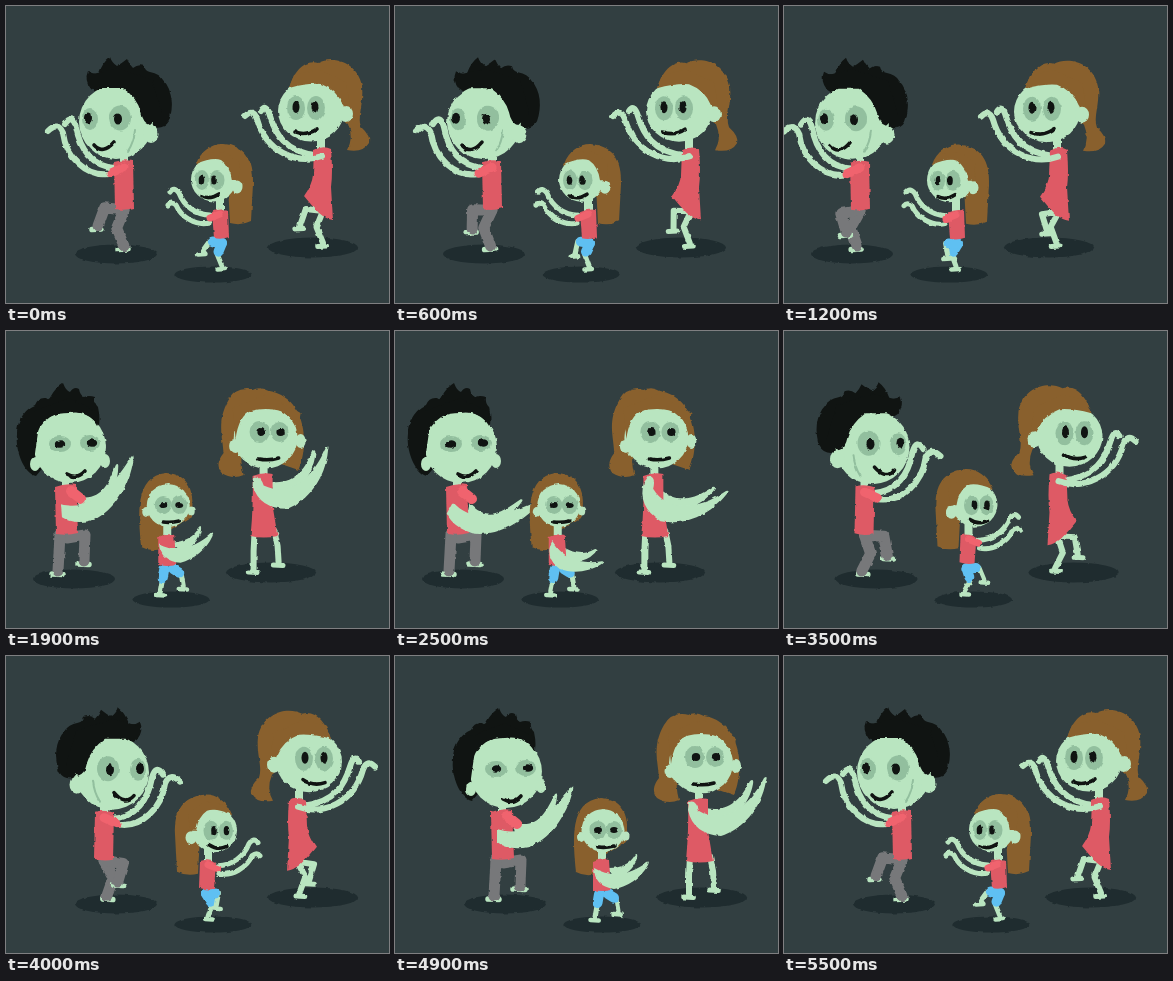
An HTML page with a canvas that plays this animation: 383 px wide and 297 px high, repeating every 5.6 s.

```html
<!DOCTYPE html>
<html lang="en">
<head>
<meta charset="utf-8">
<title>Zombie family dance</title>
<style>
  html, body { margin: 0; width: 100%; height: 100%; overflow: hidden; background: #323f41; }
  canvas { display: block; filter: url(#rough); }
  svg { position: absolute; width: 0; height: 0; }
</style>
</head>
<body>
<canvas id="stage" width="383" height="297"></canvas>
<svg aria-hidden="true">
  <filter id="rough" x="0" y="0" width="1" height="1" color-interpolation-filters="sRGB">
    <feTurbulence type="fractalNoise" baseFrequency=".16" numOctaves="2" seed="4"/>
    <feDisplacementMap in="SourceGraphic" scale="3" xChannelSelector="R" yChannelSelector="G"/>
  </filter>
</svg>
<script>
const ctx = document.getElementById('stage').getContext('2d');
const SKIN = '#b9e5c0', SHADE = '#92bf9e', DARK = '#101412', BROWN = '#89602d',
      RED = '#de5a65', SLEEVE = '#f0636e', GREY = '#77787a', BLUE = '#5fc0f2',
      GROUND = '#1f2c2f', BG = '#323f41';

// Walk art faces left, reach art faces right; axis is the line they flip about.
const family = [
  {
    axis: 108, shadow: [110, 248, 41, 9.5], k: 1, hip: [118, 204], floor: 244,
    legColor: GREY, legWidth: 11, footWidth: 5.5,
    walk: {
      hair: [DARK, 'M85 83Q78 74 82 65Q88 69 93 67Q97 56 104 51Q106 57 111 60Q116 57 121 53Q123 58 127 62Q132 58 138 60Q139 65 144 66Q154 68 157 74C167 84 168 101 163 115Q158 124 146 121L120 105Z'],
      face: [110, 116, 37, 37], ears: [[145, 128, 7.5, 9]],
      fringe: [DARK, 'M84 82Q104 82 117 82Q131 92 135 106Q137 117 144 119L156 108L146 74L110 62L84 69Z'],
      patches: [[84, 113, 8, 11], [114, 112, 11, 12.5]],
      eyes: [[82, 112, 4, 5.5], [112, 113, 4, 5.5]],
      mouth: 'M88 139Q97 149 108 136', scar: 'M129 124Q128 136 122 145',
      neck: 'M118 148V158', shirt: 'M108 156Q117 153 127 155L128 202Q119 205 109 203Z',
      sleeve: 'M118 161L105 167', sleeveWidth: 9, armWidth: 6,
      near: 'M103 168C80 171 60 151 57 127Q52 115 42 125',
      far: 'M110 162C86 161 74 143 70 121Q66 107 59 118'
    },
    reach: {
      hair: [DARK, 'M77 145C64 142 56 118 58 103C58 88 68 77 76 74Q79 66 87 67Q90 70 92 65Q97 56 104 52Q107 60 111 61Q115 55 120 58Q121 64 125 66Q130 64 136 66Q135 72 139 76Q142 90 139 97L110 105Z'],
      face: [111, 116, 36, 36], ears: [[146, 130, 5, 7], [76, 133, 5, 7]],
      fringe: [DARK, 'M75 130Q78 107 80 95Q89 82 110 82Q130 79 139 95L138 80L110 67L75 80Z'],
      patches: [[101, 113, 11, 8], [131, 112, 10, 8]],
      eyes: [[101, 113, 5.2, 3.8], [133, 112, 5.2, 3.8]],
      mouth: 'M108 143Q118 149 126 140',
      neck: 'M107 148V157', shirt: 'M96 156Q107 152 117 154L119 202Q108 205 97 203Z',
      sleeve: 'M112 160L122 168', sleeveWidth: 10, shoulder: [106, 174],
      near: 'M102 173C128 182 150 166 176 131Q179 129 178 134C172 160 154 184 134 191Q114 195 102 186Z',
      far: 'M117 166C142 174 150 158 160 138Q163 136 162 141C160 162 144 180 122 183Z',
      legs: [[108, 207, 126, 204, 125, 230], [101, 203, 100, 222, 99, 240]]
    }
  },
  {
    axis: 304, shadow: [307, 241.5, 45, 10], k: .88, hip: [317, 205], floor: 241,
    legColor: SKIN, legWidth: 6, footWidth: 5,
    walk: {
      hair: [BROWN, 'M283 83C287 66 299 53 312 57C326 50 351 55 356 80C358 98 351 110 355 121Q365 130 363 137Q357 147 341 144Q348 132 342 118L320 100Z'],
      face: [305, 105, 33, 30.5], ears: [[340, 108, 7, 8]],
      fringe: [BROWN, 'M283 82Q302 77 315 78Q331 84 337 99L344 99L340 76L312 63L288 69Z'],
      patches: [[290, 102, 9, 12], [310, 102, 9, 12]],
      eyes: [[290, 101, 3.5, 6], [309, 101, 3.5, 6]],
      mouth: 'M289 126Q301 130 311 123',
      neck: 'M315 132V146', shirt: 'M308 144Q317 139 325 143Q327 166 325 181L327 214Q320 213 313 207Q305 199 298 190Q306 179 307 169Z',
      armWidth: 6,
      near: 'M316 150C291 159 260 146 251 113Q247 102 239 110',
      far: 'M310 149C279 146 269 127 264 110Q260 97 255 105'
    },
    reach: {
      hair: [BROWN, 'M339 139C350 114 347 66 309 60Q300 55 293 59Q277 55 269 69C257 90 263 104 264 122Q255 133 262 142Q273 149 284 144Q280 130 283 120Z'],
      face: [306, 107, 32, 30.5], ears: [[341, 110, 5, 7], [275, 115, 5.5, 7]],
      fringe: [BROWN, 'M276 108Q279 85 291 80Q306 76 322 80Q335 88 338 102L341 82L307 63L273 77Z'],
      patches: [[300, 101, 10, 11], [320, 101, 9, 10]],
      eyes: [[301, 101, 4.2, 4], [321, 101, 4.2, 4]],
      mouth: 'M299 128Q309 130 319 127',
      neck: 'M304 132V146', shirt: 'M293 145Q303 141 313 143L313 175L318 205Q304 208 291 205Q294 172 293 145Z',
      shoulder: [298, 154],
      near: 'M294 146Q301 143 304 155C326 168 352 155 369 122Q373 119 371 125C366 154 346 174 326 180Q298 178 293 154Z',
      far: 'M311 152C335 157 347 141 355 125Q359 122 358 128C354 149 338 167 315 168Z',
      legs: [[315, 200, 318, 215, 319, 231], [295, 200, 294, 220, 294, 238]]
    }
  },
  {
    axis: 208, shadow: [207, 268.5, 38.5, 8], k: .75, hip: [216, 237], floor: 264,
    legColor: SKIN, legWidth: 5, footWidth: 4.5, shorts: true,
    walk: {
      hair: [BROWN, 'M190 158C195 144 207 137 218 138C239 140 248 154 247 178L245 215Q235 220 224 217L222 180Z'],
      face: [207.5, 173.5, 22.5, 22], ears: [[231, 181, 5.5, 6.5]],
      fringe: [BROWN, 'M190 158Q206 151 215 154Q224 160 226 174L233 174L234 156L218 145L198 147Z'],
      patches: [[196, 174, 7, 10], [211, 174, 7.5, 10]],
      eyes: [[195.5, 174, 2.8, 4.6], [208, 174, 2.8, 4.6]],
      mouth: 'M196 190Q204 194 213 188',
      neck: 'M214 193V206', shirt: 'M206 206Q214 202 222 204L223 231Q215 234 208 232Z',
      sleeve: 'M214 208L204 212', sleeveWidth: 7, armWidth: 5,
      near: 'M203 217C190 220 175 211 170 199Q165 195 162 199',
      far: 'M204 209C190 209 178 200 173 187Q168 180 164 186'
    },
    reach: {
      hair: [BROWN, 'M181 216C178 184 174 145 206 142C230 143 235 163 231 186L208 200L202 218Q190 221 181 216Z'],
      face: [208, 174.5, 21.5, 21.5], ears: [[231, 180, 3.5, 4.5], [186, 181, 4, 5]],
      fringe: [BROWN, 'M185 177Q187 159 196 155Q208 151 220 155Q228 160 229 172L231 162L208 146L184 157Z'],
      patches: [[203, 174, 8.5, 9], [219, 174, 8, 9]],
      eyes: [[203, 174, 4, 3], [219, 174, 4, 3]],
      mouth: 'M203 191Q211 192 219 190',
      neck: 'M207 193V206', shirt: 'M198 206Q206 202 214 204L216 234Q207 236 198 234Z',
      shoulder: [204, 216],
      near: 'M199 212C218 223 237 218 252 206Q255 204 253 209C246 222 232 231 219 233Q199 230 199 212Z',
      far: 'M211 212Q232 213 240 199Q243 196 242 202Q238 217 221 222Z',
      legs: [[213, 238, 221, 243, 223, 255], [204, 238, 202, 250, 200, 261]]
    }
  }
];

// Foot offset from the hip over one two-step cycle: phase, x, y.
const stride = [[0, -26, -20], [.35, -12, 0], [1, 0, 0], [1.4, 14, 0],
                [1.6, 9, -9], [1.85, -14, -14], [2, -26, -20]];

const mix = (a, b, u) => a + (b - a) * u;

function fill(color, d) {
  ctx.fillStyle = color;
  ctx.fill(new Path2D(d));
}
function stroke(color, width, d) {
  ctx.strokeStyle = color;
  ctx.lineWidth = width;
  ctx.stroke(new Path2D(d));
}
function oval(color, [x, y, rx, ry]) {
  ctx.fillStyle = color;
  ctx.beginPath();
  ctx.ellipse(x, y, rx, ry, 0, 0, 7);
  ctx.fill();
}

function footAt(phase) {
  const q = ((phase % 2) + 2) % 2;
  const i = stride.findIndex(s => s[0] > q);
  const a = stride[i - 1], b = stride[i], u = (q - a[0]) / (b[0] - a[0]);
  return [mix(a[1], b[1], u), mix(a[2], b[2], u)];
}

// Two equal bones, knee bending forward.
function walkLeg(c, phase, bob) {
  const [fx, fy] = footAt(phase);
  const hx = c.hip[0], hy = c.hip[1] + bob;
  const ax = hx + fx * c.k, ay = c.floor - 4 + fy * c.k;
  const dx = ax - hx, dy = ay - hy, dist = Math.hypot(dx, dy);
  const bone = (c.floor - 4 - c.hip[1]) * .54;
  const bend = Math.sqrt(Math.max(0, bone * bone - dist * dist / 4));
  const kx = (hx + ax) / 2 - dy / dist * bend, ky = (hy + ay) / 2 + dx / dist * bend;
  return [hx, hy, kx, ky, ax, ay];
}

function drawLeg(c, [hx, hy, kx, ky, ax, ay], heel, toe) {
  stroke(SKIN, c.footWidth, `M${ax + heel * c.k} ${ay + 3}L${ax + toe * c.k} ${ay + 3.5}`);
  stroke(c.legColor, c.legWidth, `M${hx} ${hy}L${kx} ${ky}L${ax} ${ay}`);
  if (c.shorts) {
    stroke(BLUE, 10, `M${hx} ${hy}L${mix(hx, kx, .75)} ${mix(hy, ky, .75)}`);
  }
}

function drawHead(a) {
  fill(...a.hair);
  stroke(SKIN, 8, a.neck);
  oval(SKIN, a.face);
  fill(...a.fringe);
  a.ears.forEach(e => oval(SKIN, e));
  a.patches.forEach(p => oval(SHADE, p));
  a.eyes.forEach(e => oval(DARK, e));
  stroke(DARK, 3.6, a.mouth);
  if (a.scar) stroke(SHADE, 2, a.scar);
}

function drawWalk(c, step) {
  const a = c.walk, bob = 3 * Math.sin(Math.PI * step) ** 2;
  drawLeg(c, walkLeg(c, step + 1, bob), 4, -6);
  drawLeg(c, walkLeg(c, step, bob), 4, -6);
  ctx.translate(0, bob);
  drawHead(a);
  stroke(SKIN, a.armWidth, a.far);
  fill(RED, a.shirt);
  stroke(SKIN, a.armWidth, a.near);
  if (a.sleeve) stroke(SLEEVE, a.sleeveWidth, a.sleeve);
}

function drawReach(c, turn) {
  const a = c.reach, [sx, sy] = a.shoulder;
  const arm = d => {
    ctx.save();
    ctx.translate(sx, sy);
    ctx.rotate(turn);
    ctx.translate(-sx, -sy);
    fill(SKIN, d);
    ctx.restore();
  };
  a.legs.forEach(leg => drawLeg(c, leg, -6, 5));
  drawHead(a);
  arm(a.far);
  fill(RED, a.shirt);
  if (a.sleeve) stroke(SLEEVE, a.sleeveWidth, a.sleeve);
  arm(a.near);
}

// One half of the dance; side 1 is the walking direction, -1 the opposite.
function poseAt(n) {
  if (n <= 13) return { side: 1, step: n / 6.5 };
  if (n >= 26) return { side: -1, step: n === 26 ? -.15 : 0 };
  const reach = (side, turn = 0, dx = 0) => ({ side, turn, dx });
  if (n === 14) return reach(1, .5);
  if (n === 15) return reach(-1, .4, -3);
  if (n < 19) return reach(-1);
  if (n === 19) return reach(-1, -.08, -5);
  if (n === 20) return reach(1, .5, -3);
  if (n < 24) return reach(1);
  if (n === 24) return reach(1, -.08, -5);
  return reach(-1, .5, -3);
}

function draw(tick) {
  const back = tick >= 28, n = tick % 28;
  const pose = poseAt(n);
  const went = 42 * Math.min(n, 12) / 12;
  const travel = back ? went - 42 : -went;
  const left = (pose.side === 1) !== back;
  ctx.setTransform(1, 0, 0, 1, 0, 0);
  ctx.fillStyle = BG;
  ctx.fillRect(0, 0, 383, 297);
  ctx.lineCap = ctx.lineJoin = 'round';
  for (const c of family) {
    ctx.save();
    ctx.translate(travel, 0);
    oval(GROUND, c.shadow);
    const walking = 'step' in pose;
    if (left !== walking) {
      ctx.translate(2 * c.axis, 0);
      ctx.scale(-1, 1);
    }
    if (walking) {
      drawWalk(c, pose.step);
    } else {
      ctx.translate(pose.dx * c.k, 0);
      drawReach(c, pose.turn);
    }
    ctx.restore();
  }
}

function loop() {
  draw(Math.floor(performance.now() / 100) % 56);
  requestAnimationFrame(loop);
}
loop();
</script>
</body>
</html>
```
